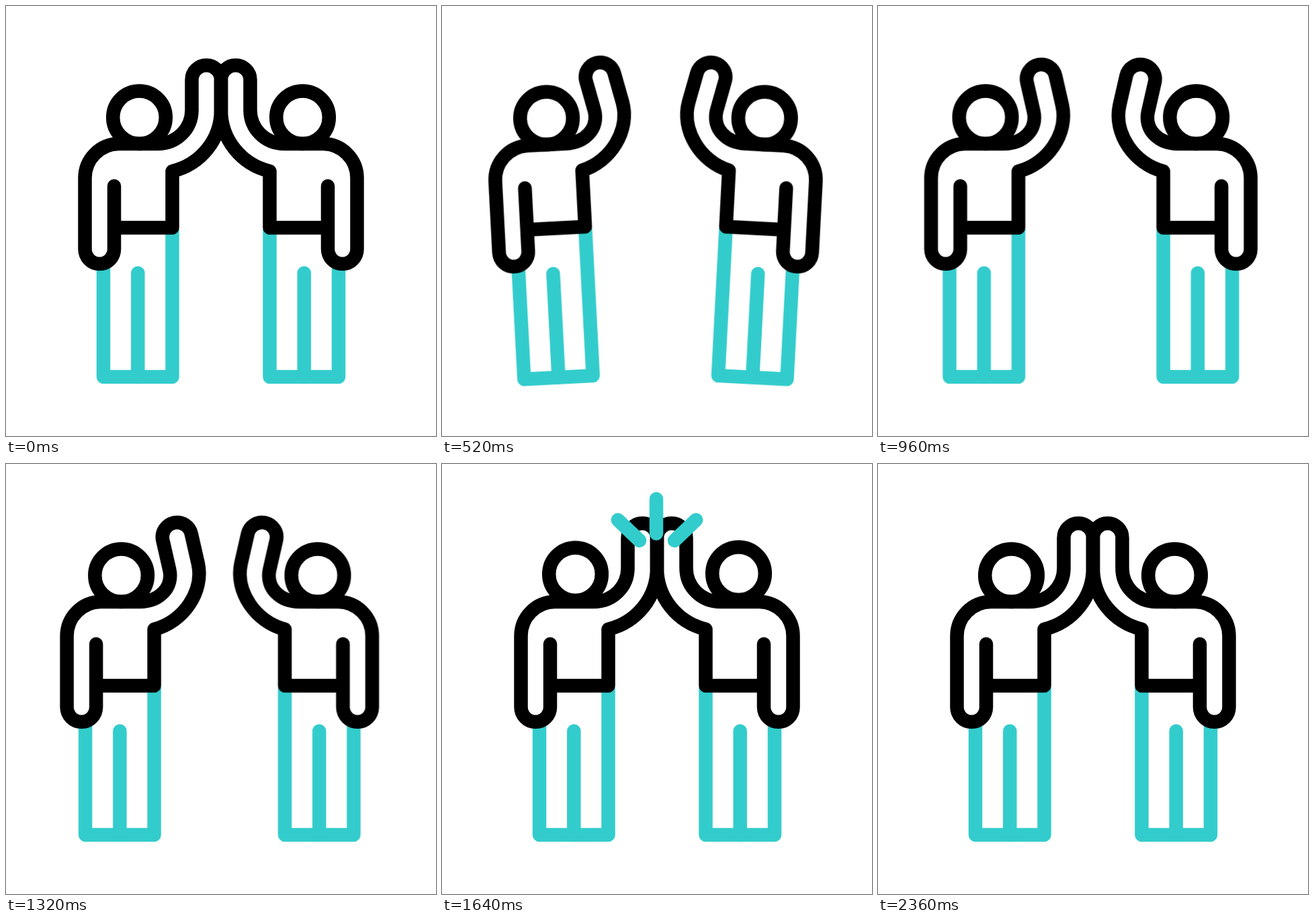
Animation of 640x640 px, one loop 2600 ms. Source, as an HTML page:

```html
<!DOCTYPE html>
<html lang="en">
<head>
<meta charset="utf-8">
<title>High five</title>
<style>
html, body { margin: 0; width: 100%; height: 100%; overflow: hidden; background: #fff; }
svg { display: block; width: 100%; height: 100%; }
path, circle { fill: none; stroke: #000; stroke-width: 20.5; stroke-linejoin: round; }
.body, .spark { stroke-linecap: round; }
.legs, .foot, .spark { stroke: #3cc; }
.foot { stroke-linecap: round; }

.walk, .lean, .body, .head, .spark {
  animation: 2600ms cubic-bezier(.37, 0, .63, 1) infinite;
}
.left .walk { animation-name: walk-left; }
.right .walk { animation-name: walk-right; }
.left { --bob: -4px; }
.right { --bob: -6px; }
.lean { animation-name: lean; transform-origin: 218.5px 320px; }
.body { animation-name: bend; }
.head { animation-name: bob; }
.spark { animation-name: flash; stroke-dasharray: 1 3; }

/* step apart, then step together; the right one takes a shorter step */
@keyframes walk-left {
  0%, 1.538% { transform: translateX(0); }
  24.615%, 45.385% { transform: translateX(-38.5px); }
  60%, 100% { transform: translateX(0); }
}
@keyframes walk-right {
  0%, 1.538% { transform: translateX(0); }
  23.077%, 45.385% { transform: translateX(-32.2px); }
  60%, 100% { transform: translateX(0); }
}
@keyframes lean {
  0%, 1.538% { transform: rotate(0deg); }
  14.615%, 24.615% { transform: rotate(-3deg); }
  36.154%, 100% { transform: rotate(0deg); }
}
/* forearm swings back, then claps */
@keyframes bend {
  0%, 1.538%, 60%, 100% {
    d: path("M161 268V362A21.75 21.75 0 0 1 117.5 362V256A51 51 0 0 1 168 205H226C254 205 276.5 183 276.5 155L276.5 110A21.75 21.75 0 0 1 320 110L320 155C320 198 290.5 235.5 247.5 246V330H161");
  }
  14.615%, 51.538% {
    d: path("M161 268V362A21.75 21.75 0 0 1 117.5 362V256A51 51 0 0 1 168 205H226C254 205 276.2 184.7 270.2 157.3L260.2 113.4A21.75 21.75 0 0 1 302.7 104L312.7 147.9C322 189.9 290.5 235.5 247.5 246V330H161");
  }
}
@keyframes bob {
  0%, 58.846% { transform: translateY(0); }
  67.692% { transform: translateY(var(--bob)); }
  90.769%, 100% { transform: translateY(0); }
}
/* sparks grow outwards, then slip away */
@keyframes flash {
  0%, 58.84% { opacity: 0; stroke-dashoffset: 1; }
  58.85% { opacity: 1; stroke-dashoffset: 1; animation-timing-function: cubic-bezier(.333, .667, .667, 1); }
  67.692%, 70.769% { opacity: 1; stroke-dashoffset: 0; }
  81.53% { opacity: 1; stroke-dashoffset: -1; }
  81.54%, 100% { opacity: 0; stroke-dashoffset: -1; }
}
</style>
</head>
<body>
<svg viewBox="0 0 640 640">
  <g class="left">
    <g class="walk"><g class="lean">
      <path class="legs" d="M145 384V552H247.5V332"/>
      <path class="foot" d="M196.3 397.5V552"/>
      <circle class="head" cx="198.5" cy="165.8" r="39.3"/>
      <path class="body" d="M161 268V362A21.75 21.75 0 0 1 117.5 362V256A51 51 0 0 1 168 205H226C254 205 276.5 183 276.5 155L276.5 110A21.75 21.75 0 0 1 320 110L320 155C320 198 290.5 235.5 247.5 246V330H161"/>
    </g></g>
  </g>
  <g class="right" transform="translate(640) scale(-1 1)">
    <g class="walk"><g class="lean">
      <path class="legs" d="M145 384V552H247.5V332"/>
      <path class="foot" d="M196.3 397.5V552"/>
      <circle class="head" cx="198.5" cy="165.8" r="39.3"/>
      <path class="body" d="M161 268V362A21.75 21.75 0 0 1 117.5 362V256A51 51 0 0 1 168 205H226C254 205 276.5 183 276.5 155L276.5 110A21.75 21.75 0 0 1 320 110L320 155C320 198 290.5 235.5 247.5 246V330H161"/>
    </g></g>
  </g>
  <path class="spark" pathLength="1" d="M319 103.5V33"/>
  <path class="spark" pathLength="1" d="M294 114L250 72"/>
  <path class="spark" pathLength="1" d="M346 114L390 72"/>
</svg>
</body>
</html>
```
